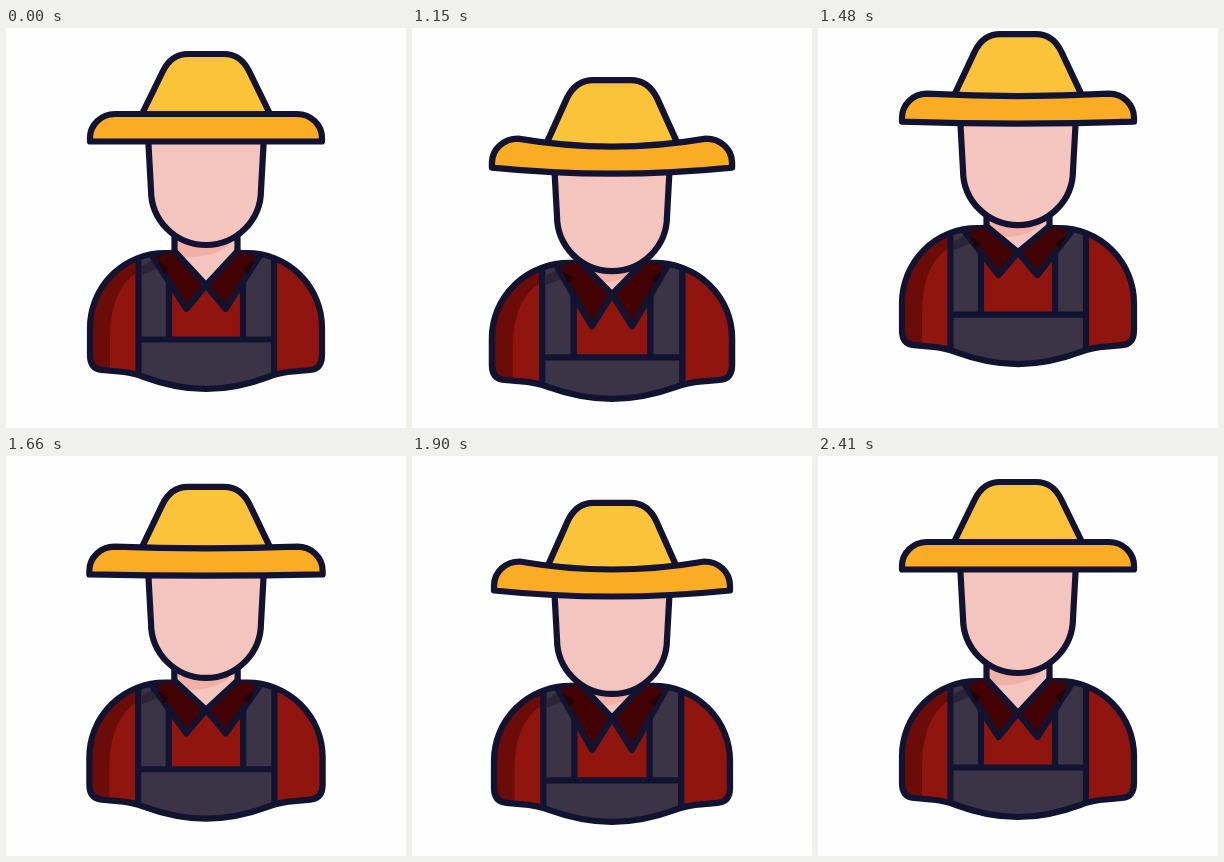
Recreate the animation shown at these times as an HTML page. Size 400x400 px, loop 2.44 s.

```html
<!DOCTYPE html>
<html lang="en">
<head>
<meta charset="utf-8">
<title>Farmer jump</title>
<style>
  html, body { margin: 0; width: 100%; height: 100%; overflow: hidden; background: #fefefe; }
  svg { display: block; width: 100vw; height: 100vh; }
  .line { stroke: #121331; stroke-width: 6.2; stroke-linejoin: round; stroke-linecap: round; }
</style>
</head>
<body>
<svg viewBox="0 0 400 400" fill="none">
  <defs>
    <path id="torso" d="M84 300A75 75 0 0 1 159 225H241A75 75 0 0 1 316 300V327Q316 341 304 342L282 344
      Q273 345 262 349Q230 361 200 361T138 349Q127 345 118 344L96 342Q84 341 84 327Z"/>
    <clipPath id="inside"><use href="#torso"/></clipPath>
  </defs>
  <g id="body">
    <g clip-path="url(#inside)">
      <path fill="#90150f" d="M70 210H330V380H70Z"/>
      <path fill="#6c0c09" d="M70 210H142V239Q104 253 104 310V360H70Z"/>
      <path id="overall" class="line" fill="#3b3447"/>
      <path fill="#2a2436" d="M136 238L148 231L156 239L136 247Z"/>
    </g>
    <use href="#torso" class="line"/>
    <path id="throat" fill="#f4c5be"/>
    <path id="shadow" fill="#f0b0a6" d="M171 205H222V218Q206 230 178 229L171 223Z"/>
    <path class="line" d="M168.500 185V223M231.500 185V223"/>
    <path id="collar" class="line" fill="#420203"/>
    <path fill="#1f0307" d="M152 233L163 240L158 246ZM248 233L237 240L242 246Z"/>
  </g>
  <path id="head" class="line" fill="#f4c5be" d="M142 108L145 162A55 55 0 0 0 255 162L258 108Z"/>
  <g id="hat">
    <path id="crown" class="line" fill="#fbc33a"/>
    <path id="brim" class="line" fill="#fbac25"/>
  </g>
</svg>
<script>
const LOOP = 2440, START = 1030, STEP = 30;
const el = id => document.getElementById(id);
const draw = (id, d) => el(id).setAttribute("d", d);
const place = (id, y, sx = 1) =>
  el(id).setAttribute("transform", `translate(${200 * (1 - sx)} ${y}) scale(${sx} 1)`);

const easeOut = u => 1 - (1 - u) ** 2;
const easeBoth = u => (1 - Math.cos(Math.PI * u)) / 2;

// Turning points of the jump: rest, crouch, peak, landing, rebound, settle, rest.
const beats = [[1000, 0], [1140, 10], [1495, -25], [1740, 10], [2100, -2.5], [2230, 2], [2400, 0]];

function height(t) {
  const i = beats.findIndex(([end]) => t < end);
  if (i < 1) return 0;
  const [t0, y0] = beats[i - 1], [t1, y1] = beats[i];
  return y0 + (y1 - y0) * (i === 1 ? easeOut : easeBoth)((t - t0) / (t1 - t0));
}

// A smooth hump, 1 at mid and 0 beyond reach.
function hump(t, mid, reach) {
  const u = Math.min(1, Math.abs(t - mid) / reach);
  return easeBoth(1 - u);
}

function pose(t) {
  const body = height(t);
  const squash = 16 * hump(t, 1160, 140) + 18 * hump(t, 1855, 215);
  const flight = hump(t, 1485, 400);
  const nod = squash + 5 * flight;
  const head = body + nod;
  const bend = nod / 2;
  const sx = 1 + Math.max(0, body) * 0.0035;

  place("body", body, sx);
  place("head", head);
  place("hat", head, sx);
  place("shadow", nod);

  const bib = 311.5 + squash / 2;
  draw("overall", `M132.500 215H163V${bib}H237V215H268V380H132.500ZM132.500 ${bib}H268`);

  const tip = 281 + squash / 2 - 9 * flight, vee = 257 - 8 * flight;
  draw("throat", `M168.500 185H231.500V223L200 ${vee}L168.500 223Z`);
  draw("collar", [-1, 1].map(s =>
    `M${200 + 53 * s} 229L${200 + 19.5 * s} ${tip}L200 ${vee}L${200 + 31.5 * s} 223`).join(""));

  const foot = 86 + bend * 0.6, lift = -bend * 0.18;
  const top = 86 + lift, side = 110 + lift;
  draw("crown", `M136 ${foot}L156.500 44Q165 26 182 26H218Q235 26 243.500 44L264 ${foot}` +
    `Q200 ${foot + bend} 136 ${foot}Z`);
  draw("brim", `M84 113.500Q200 ${113.5 + bend * 1.5} 316 113.500V${side}A25 24 0 0 0 291 ${top}` +
    `Q200 ${86 + bend * 1.8} 109 ${top}A25 24 0 0 0 84 ${side}Z`);
}

const begin = performance.now();
function tick() {
  const t = (performance.now() - begin) % LOOP;
  pose(t < START ? 0 : START + Math.floor((t - START) / STEP) * STEP);
  requestAnimationFrame(tick);
}
tick();
</script>
</body>
</html>
```
